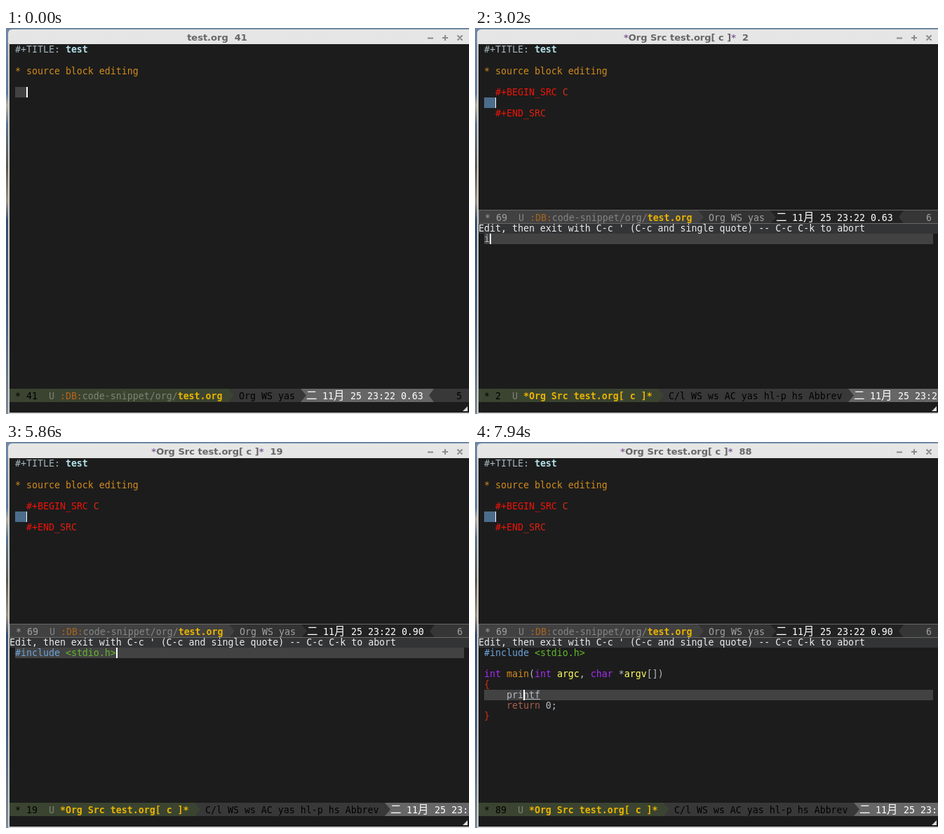
An HTML page for the animation above (7990 ms loop, 660 by 550 pixels).

```html
<!DOCTYPE html>
<html lang="en">
<head>
<meta charset="utf-8">
<title>Source block editing</title>
<style>
html, body { margin: 0; width: 100%; height: 100%; overflow: hidden; background: #1c1c1c; }
svg { display: block; }
text { white-space: pre; font: 13.288px "DejaVu Sans Mono", monospace; }
.b { font-weight: bold; }
.cjk { font: 15.5px "Noto Sans CJK SC", "Noto Sans CJK JP", "Noto Sans CJK", sans-serif; }
.title { font: bold 13px "DejaVu Sans", sans-serif; text-anchor: middle; }
.menu { font: 12px "DejaVu Sans", sans-serif; }
</style>
</head>
<body>
<svg width="660" height="550" viewBox="0 0 660 550">
  <defs>
    <linearGradient id="desk" x2="0" y2="1">
      <stop offset="0" stop-color="#6f87a3"/>
      <stop offset=".17" stop-color="#5f7c9c"/>
      <stop offset=".2" stop-color="#b5b0a0"/>
      <stop offset=".25" stop-color="#587492"/>
      <stop offset=".36" stop-color="#5d5a4c"/>
      <stop offset=".45" stop-color="#a0907e"/>
      <stop offset=".5" stop-color="#34506e"/>
      <stop offset=".75" stop-color="#45617f"/>
      <stop offset="1" stop-color="#7d8b98"/>
    </linearGradient>
    <linearGradient id="bar" x2="0" y2="1">
      <stop offset="0" stop-color="#e6e6e6"/>
      <stop offset="1" stop-color="#cdcdcd"/>
    </linearGradient>
    <clipPath id="win"><rect x="5" y="0" width="655" height="550"/></clipPath>
  </defs>
  <rect width="660" height="550" fill="url(#desk)"/>
  <path d="M3 550V8Q3 2 9 2H660V550Z" fill="url(#bar)"/>
  <rect x="3" y="22" width="2" height="528" fill="#d2d2d2"/>
  <rect x="5" y="23" width="655" height="525" fill="#1c1c1c"/>
  <rect x="3" y="548" width="657" height="2" fill="#d0d0d0"/>
  <path d="M601 14.5h8M622 14h8M626 10v8M643.5 10.500l7 7M650.500 10.500l-7 7" stroke="#8c8c8c" stroke-width="2" fill="none"/>
  <g id="view" clip-path="url(#win)"></g>
  <path d="M651 546L658 539V546Z" fill="#d8d8d8"/>
</svg>
<script>
const LOOP = 7990, CW = 8, LEFT = 13;
const view = document.getElementById('view');
const C = {
  hl: '#424242', fg: '#b4bcc2', red: '#ee1408', brick: '#cc3018', gold: '#e8b400',
  key: '#a62cf4', arg: '#ffff5f', fn: '#d98a18', pre: '#6ca3d8', str: '#62b82c'
};
const active = { seg: ['#3b4430', '#383838', '#666666', '#383838'], num: '#000', dim: '#7c8474', db: '#b8651b', mode: '#000', pos: '#000' };
const idle = { seg: ['#414141', '#333333', '#222222', '#363636'], num: '#a0a0a0', dim: '#858585', db: '#a8651f', mode: '#a0a0a0', pos: '#a0a0a0' };

const esc = s => String(s).replace(/&/g, '&amp;').replace(/</g, '&lt;').replace(/>/g, '&gt;');
const rect = (x, y, w, h, fill) => `<rect x="${x}" y="${y}" width="${w}" height="${h}" fill="${fill}"/>`;
const poly = (d, fill) => `<path d="${d}" fill="${fill}"/>`;
// parts: [text, colour, class]
const line = (x, y, parts, cls = '') => `<text x="${x}" y="${y}" class="${cls}">` +
  parts.map(([s, c, k = '']) => `<tspan fill="${c}" class="${k}">${esc(s)}</tspan>`).join('') + '</text>';
const cursor = (x, y, w = 2) => rect(x, y, w, 15, '#fff');

function title(name, size) {
  const parts = name.split(/(\*)/).map(s => [s, s === '*' ? '#80609a' : '#676767']);
  return line(301, 18, [...parts, ['  ' + size, '#676767']], 'title');
}

function modeline(y, m) {
  const p = m.pal, [a, b, c, d] = p.seg, dx = m.pal === idle ? 1 : 0;
  const head = '* ' + m.size + '  ';
  const x0 = LEFT + dx;
  const end = x0 + CW * (head.length + 2 + m.dir.length + m.name.length);
  const a1 = end + 8, modeX = end + 23;
  const a2 = modeX + m.modes.length * CW + 8, dateX = a2 + 8, a3 = dateX + 175;
  const mid = y + 9.5, bot = y + 19, base = y + 15;
  const arrow = (x, fill) => poly(`M${x} ${y}L${x + 8} ${mid}L${x} ${bot}Z`, fill);
  const dir = m.dir ? [[':DB:', p.db], [m.dir.slice(4), p.dim]] : [];
  let s = rect(5, y, 655, 19, d) + rect(a2, y, a3 + 7 - a2, 19, c) + rect(a1, y, a2 - a1, 19, b) +
    rect(5, y, a1 - 5, 19, a) + arrow(a1, a) + arrow(a2, b) +
    poly(`M${a3 + 7} ${y}L${a3} ${mid}L${a3 + 7} ${bot}Z`, d);
  s += line(x0, base, [[head, p.num], ['U ', p.dim], ...dir, [m.name, C.gold, 'b']]);
  s += line(modeX, base, [[m.modes, p.mode]]);
  s += line(dateX, base, [['二', '#fff']], 'cjk') + line(dateX + 23, base, [['11', '#fff']]) +
    line(dateX + 39, base, [['月', '#fff']], 'cjk') + line(dateX + 63, base, [['25 23:22 ' + m.load, '#fff']]);
  if (m.row) s += line(642 + dx, base, [[m.row, p.pos]]);
  if (dx) s += `<path d="M5 ${y - .5}H660M5 ${bot - .5}H660M5.5 ${y}V${bot}" stroke="#686868" fill="none"/>`;
  return s;
}

const orgBar = (y, pal, size, row, load) => modeline(y, {
  pal, size, row, load, dir: ':DB:code-snippet/org/', name: 'test.org', modes: 'Org WS yas'
});

function orgText(block) {
  let s = line(LEFT, 35, [['#+TITLE: ', '#a4b4bc'], ['test', '#b4e2ea', 'b']]) +
    line(LEFT, 66, [['* source block editing', '#d28c1c']]);
  if (block != null) s += line(29, 96, [['#+BEGIN_SRC ', C.red], [block, C.brick]]) +
    line(29, 126, [['#+END', C.red], ['_SRC', '#dc2010']]);
  return s;
}

// Single window: typed text, or an expanded block with its language
function org(o) {
  const x = LEFT + o.col * CW, y = o.row === 6 ? 99 : 84;
  const w = o.block == null ? x - LEFT : 640;
  let s = title('test.org', o.head || o.size) + rect(LEFT, y, w, 15, C.hl) + orgText(o.block);
  if (o.typed) s += line(29, 96, [[o.typed, C.fg]]);
  return s + cursor(x, y) + orgBar(514, active, o.size, o.row, '0.63');
}

function popup(chosen) {
  const text = (x, y, parts) => line(x, y, parts, 'menu');
  return '<rect x="39.500" y="298.500" width="150" height="75" fill="#fff" stroke="#bcbcbc"/>' +
    text(59, 313, [['Choose a snippet:', '#747474']]) +
    '<path d="M42 322.500H187M42 329.500H187" stroke="#cfcfcf"/>' +
    (chosen ? rect(40, 333, 149, 20, '#a9d095') : '') +
    text(71, 347, [['#include <...>', chosen ? '#fff' : '#222']]) +
    text(71, 367, [['#include ', '#222'], ['"..."', '#944a20']]);
}

// Split window: org buffer above, code buffer below
function src(o) {
  const load = o.load || '0.90', name = '*Org Src test.org[ c ]*';
  const y = 293 + o.row * 15, x = LEFT + o.col * CW;
  let s = title(name, o.head || o.size) + rect(LEFT, 99, 16, 15, '#4c6c8c') + orgText('C') + cursor(29, 99, 1);
  s += orgBar(260, idle, 69, 6, load) + rect(5, 279, 655, 14, '#323436') +
    line(5, 290, [["Edit, then exit with C-c ' (C-c and single quote) -- C-c C-k to abort", '#ececec']]);
  if (o.size) s += rect(LEFT, y, 640, 15, C.hl);
  if (o.field) s += rect(93, 293, o.field * CW, 15, '#00008b');
  o.rows.forEach((r, i) => { s += line(LEFT, 305 + i * 15, r); });
  if (o.hint) s += rect(x, y + 13, o.hint * CW, 1, C.fg);
  s += cursor(x, y) + modeline(514, {
    pal: active, size: o.size, load, dir: '', name, modes: 'C/l WS ws AC yas hl-p hs Abbrev'
  });
  return s + (o.menu ? popup(o.menu === 2) : '');
}

const plain = (s, size, extra) => src({ rows: [[[s, C.fg]]], row: 0, col: s.length, size, load: '0.63', ...extra });
const include = h => [['#include', C.pre], [' ', C.fg], ['<' + h + '>', C.str]];
const header = h => src({ rows: [include(h)], row: 0, col: 10 + h.length, field: h.length, size: 12 + h.length });
const below = (s, row, size) => src({ rows: [include('stdio.h'), [], [[s, C.fg]]], row, col: row ? s.length : 18, size });
const body = (s, size, extra = {}) => src({
  rows: [
    include('stdio.h'), [],
    [['int', C.key], [' ', C.fg], ['main', C.fn], ['(', C.fg], ['int', C.key], [' ', C.fg], ['argc', C.arg], [', ', C.fg],
      ['char', C.key], [' *', C.fg], ['argv', C.arg], ['[])', C.fg]],
    [['{', C.brick]],
    [['    ' + s, C.fg]],
    [['    ', C.fg], ['return', '#a8604c'], [' 0;', C.fg]],
    [['}', C.brick]]
  ],
  row: 4, col: 4 + s.length, size, ...extra
});

const steps = [
  [0, () => org({ size: 41, row: 5, col: 2 })],
  [460, () => org({ size: 42, row: 5, col: 3, typed: '<' })],
  [670, () => org({ size: 43, row: 5, col: 4, typed: '<s' })],
  [880, () => org({ size: 68, row: 5, col: 14, block: '' })],
  [1330, () => org({ size: 69, head: 68, row: 5, col: 15, block: 'C' })],
  [1760, () => org({ size: 69, row: 6, col: 2, block: 'C' })],
  [2260, () => plain('', 0)],
  [2610, () => plain('', 1)],
  [3020, () => plain('i', 2)],
  [3450, () => plain('in', 3)],
  [3570, () => plain('inc', 16)],
  [3970, () => plain('inc', 16, { menu: 1 })],
  [4150, () => plain('inc', 16, { menu: 2 })],
  [4440, () => header('')],
  [4650, () => header('s')],
  [4820, () => header('st')],
  [5030, () => header('std')],
  [5140, () => header('stdi')],
  [5240, () => header('stdio')],
  [5490, () => header('stdio.')],
  [5640, () => header('stdio.h')],
  [5820, () => below('', 0, 19)],
  [6020, () => below('', 1, 20)],
  [6220, () => below('', 2, 21)],
  [6430, () => below('m', 2, 22)],
  [6660, () => below('ma', 2, 23)],
  [6770, () => below('mai', 2, 24)],
  [6880, () => below('main', 2, 25)],
  [7090, () => body('', 76)],
  [7640, () => body('p', 77)],
  [7740, () => body('pr', 78)],
  [7840, () => body('pri', 79)],
  [7940, () => body('printf', 89, { head: 88, col: 7, hint: 3 })]
];

let shown = -1;
function render(t) {
  let i = steps.length - 1;
  while (steps[i][0] > t) i--;
  if (i !== shown) view.innerHTML = steps[shown = i][1]();
}
const start = performance.now();
function tick() {
  render((performance.now() - start) % LOOP);
  requestAnimationFrame(tick);
}
render(0);
requestAnimationFrame(tick);
</script>
</body>
</html>
```
